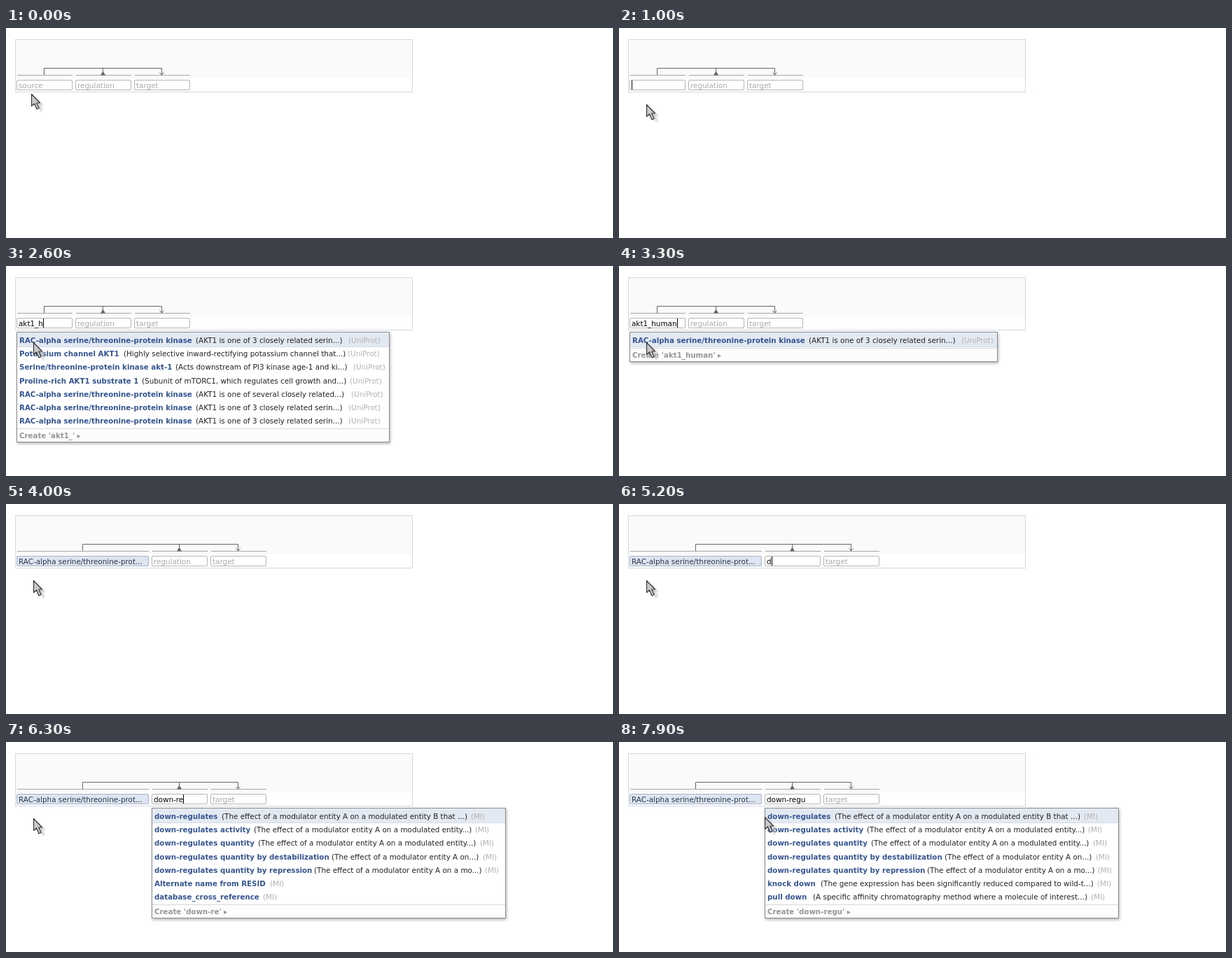
These frames come from a looping animation (867x300 px, 8000 ms). An HTML page:

```html
<!DOCTYPE html>
<html lang="en">
<head>
<meta charset="utf-8">
<title>Annotation editor</title>
<style>
html, body { margin: 0; width: 100%; height: 100%; overflow: hidden; background: #fff; }
#stage { position: relative; width: 867px; height: 300px; overflow: hidden; font: 10.4px/14px "DejaVu Sans", sans-serif; color: #222; }
#stage *, svg { position: absolute; box-sizing: border-box; }
#stage span { white-space: pre; }
svg { left: 0; top: 0; }
#panel { left: 13px; top: 16px; width: 568px; height: 76px; border: 1px solid #d3d7e6; background: linear-gradient(#fafafa 55px, #fff 55px); }
.field { top: 74px; height: 15px; border: 1px solid #b4b4b4; border-radius: 2px; background: #fff; }
.field span { left: 2px; top: 0; height: 13px; color: #000; }
.field .hint { color: #aaa; }
.field.chip { background: #dde5f1; border-color: #a8b3c8; }
.field.chip span { color: #2c3448; }
.field .caret { border-right: 1px solid #000; }
#popup { top: 94px; border: 1px solid #8c8c8c; background: #fff; box-shadow: 1px 2px 4px rgba(0, 0, 0, .3); }
.active { left: 0; top: 0; width: 100%; height: 21px; background: #e3e9f2; border-bottom: 1px solid #d6dde9; }
.footer { left: 0; bottom: 0; width: 100%; height: 19px; border-top: 1px solid #d8d8d8; background: #fdfdfd; }
.name { font-size: 10.25px; font-weight: bold; color: #36558f; }
.tag { color: #b2b2b2; }
.create { font-size: 10.25px; font-weight: bold; color: #969696; }
</style>
</head>
<body>
<div id="stage">
  <div id="panel"></div>
  <div id="form"></div>
  <div id="list"></div>
  <svg width="867" height="300">
    <defs>
      <path id="arrow" d="M0 0V17L4 13.5 7.5 21.5 10.7 20 7.2 12.5H12Z"/>
      <filter id="soft" x="-50%" y="-50%" width="200%" height="200%"><feGaussianBlur stdDeviation=".9"/></filter>
    </defs>
    <g id="pointer">
      <use href="#arrow" x="6" y="4" fill="#bbb" opacity=".65" filter="url(#soft)"/>
      <use href="#arrow" x=".5" y=".5" fill="#c9c9c9" stroke="#3a3a3a" stroke-width="1.2" stroke-linejoin="round"/>
    </g>
  </svg>
</div>
<script>
const LOOP = 8000;
const byId = id => document.getElementById(id);

// Row: name, description, description x, tag x
const catalyzes = ['Pyrimidine/purine nucleoside phosphorylase', 'Catalyzes the phosphorolysis of diver...', 284, 502];
const kinase = ['RAC-alpha serine/threonine-protein kinase', 'AKT1 is one of 3 closely related serin...', 272, 490];
const effect = 'The effect of a modulator entity A on a';
const down = ['down-regulates', effect + ' modulated entity B that ...', 309, 665];
const downAll = [
  down,
  ['down-regulates activity', effect + ' modulated entity...', 355, 671],
  ['down-regulates quantity', effect + ' modulated entity...', 361, 678],
  ['down-regulates quantity by destabilization', 'The effect of a modulator entity A on...', 466, 682],
  ['down-regulates quantity by repression', effect + ' mo...', 441, 685]
];
const bare = (name, x) => [name, '', 0, x];

const proteins = (width, rows) => ({ x: 15, width, tag: '(UniProt)', rows });
const terms = (width, rows) => ({ x: 208, width, tag: '(MI)', rows });
const lists = {
  ak: proteins(548, [
    catalyzes,
    ['Multifunctional fusion protein [Includes: GTP cyc...', 'Catalyzes the conversion of D...', 317, 497],
    catalyzes,
    ['Bifunctional protein GlmU [Includes: UDP-N-acetyl...', 'Catalyzes the last two sequen...', 325, 504],
    ['Siroheme synthase [Includes: Uroporphyrinogen-III...', 'Multifunctional enzyme that c...', 337, 512],
    ['Fatty acid oxidation complex subunit alpha [Inclu...', 'Involved in the aerobic and a...', 321, 499],
    ['Multifunctional fusion protein [Includes: ADP-dep...', 'Bifunctional enzyme that cata...', 323, 502]
  ]),
  akt: proteins(533, [
    kinase,
    ['Potassium channel AKT1', 'Highly selective inward-rectifying potassium channel that...', 169, 489],
    ['Serine/threonine-protein kinase akt-1', 'Acts downstream of PI3 kinase age-1 and ki...', 243, 497],
    ['Proline-rich AKT1 substrate 1', 'Subunit of mTORC1, which regulates cell growth and...', 195, 492],
    [kinase[0], 'AKT1 is one of several closely related...', 272, 494],
    kinase,
    kinase
  ]),
  human: proteins(526, [kinase]),
  start: terms(486, [
    down, bare('domain', 266), bare('donor', 256), bare('dose response', 310),
    bare('docking', 269), bare('double tag', 287), bare('dot blot', 271)
  ]),
  cross: terms(506, [...downAll, bare('Alternate name from RESID', 378), bare('database_cross_reference', 368)]),
  regu: terms(506, [
    ...downAll,
    ['knock down', 'The gene expression has been significantly reduced compared to wild-t...', 289, 684],
    ['pull down', 'A specific affinity chromatography method where a molecule of interest...', 278, 675]
  ])
};

// Each step changes part of the state: at = pointer, text = typed, list + query = popup
const steps = [
  [0, { at: [36, 94], focus: -1, text: '', caret: true, chip: false, list: '', query: '' }],
  [100, { at: [36, 93] }],
  [300, { at: [44, 88] }],
  [400, { at: [60, 80] }],
  [500, { at: [71, 75] }],
  [800, { at: [64, 84], focus: 0 }],
  [900, { at: [48, 100] }],
  [1000, { at: [39, 109] }],
  [1600, { text: 'a' }],
  [1700, { text: 'ak', list: 'ak', query: 'ak' }],
  [1900, { text: 'akt' }],
  [2000, { list: 'akt', query: 'akt' }],
  [2200, { text: 'akt1' }],
  [2300, { query: 'akt1' }],
  [2400, { text: 'akt1_' }],
  [2500, { query: 'akt1_' }],
  [2600, { text: 'akt1_h' }],
  [2700, { list: 'human', query: 'akt1_h' }],
  [2800, { text: 'akt1_hu' }],
  [2900, { query: 'akt1_hu' }],
  [3000, { text: 'akt1_hum' }],
  [3100, { text: 'akt1_huma', query: 'akt1_hum' }],
  [3200, { text: 'akt1_human', query: 'akt1_huma' }],
  [3300, { query: 'akt1_human' }],
  [3900, { list: '' }],
  [4000, { chip: true, focus: -1, text: '' }],
  [4100, { focus: 1 }],
  [5200, { text: 'd' }],
  [5300, { text: 'do', list: 'start', query: 'd' }],
  [5400, { text: 'dow', query: 'do' }],
  [5500, { text: 'down', query: 'down' }],
  [5700, { text: 'down-', list: 'cross', query: 'down-' }],
  [6100, { text: 'down-r' }],
  [6200, { query: 'down-r' }],
  [6300, { text: 'down-re', query: 'down-re' }],
  [6500, { text: 'down-reg', list: 'regu', query: 'down-reg' }],
  [6700, { text: 'down-regu', query: 'down-regu' }],
  [7100, { caret: false }],
  [7400, { at: [52, 110] }],
  [7500, { at: [92, 109] }],
  [7600, { at: [146, 107] }],
  [7700, { at: [196, 105] }],
  [7800, { at: [216, 106] }],
  [7900, { at: [208, 107] }]
];

let merged = {};
const states = steps.map(([time, change]) => (merged = { ...merged, ...change, time }));

const span = (cls, x, y, text) => `<span class="${cls}" style="left:${x}px;top:${y}px">${text}</span>`;

function formHtml(s) {
  const shift = s.chip ? 109 : 0;
  const fields = [
    { x: 15, w: 80 + shift, hint: 'source' },
    { x: 99 + shift, w: 80, hint: 'regulation' },
    { x: 183 + shift, w: 80, hint: 'target' }
  ];
  const boxes = fields.map((f, i) => {
    const chip = s.chip && i === 0;
    const typing = s.focus === i;
    const text = chip ? 'RAC-alpha serine/threonine-prot...' : typing ? s.text : f.hint;
    const cls = chip ? '' : typing ? (s.caret ? 'caret' : '') : 'hint';
    return `<div class="field ${chip ? 'chip' : ''}" style="left:${f.x}px;width:${f.w}px"><span class="${cls}">${text}</span></div>`;
  }).join('');
  const [a, b, c] = fields.map(f => Math.floor(f.x + f.w / 2) + (f.w === 80 ? -.5 : .5));
  const from = s.chip ? a : a + .0;
  const rules = fields.map(f => `M${f.x + 1} 67.5h${f.w - 1}`).join('');
  return boxes + `<svg width="867" height="92" fill="none">
    <path d="${rules}" stroke="#a6a6a6"/>
    <path d="M${from} 67V57.5H${c}V67M${b} 57.5V63M${c - 3} 63.5L${c} 67L${c + 3} 63.5" stroke="#666"/>
    <path d="M${b} 61.5L${b + 3.5} 67.5H${b - 3.5}Z" fill="#666"/></svg>`;
}

function listHtml(s) {
  const list = lists[s.list];
  if (!list) return '';
  const { x, width, tag, rows } = list;
  const last = 106 + 19.17 * (rows.length - 1);
  // Positions inside the popup's border
  const left = px => px - x - 2;
  const top = centre => Math.round(centre) - 102;
  const lines = rows.map(([name, about, aboutX, tagX], i) => {
    const y = top(106 + 19.17 * i);
    return span('name', 3, y, name) + (about && span('about', left(aboutX), y, `(${about})`)) + span('tag', left(tagX), y, tag);
  }).join('');
  return `<div id="popup" style="left:${x}px;width:${width}px;height:${Math.round(last) - 63}px">
    <div class="active"></div><div class="footer"></div>${lines}
    ${span('create', 3, top(last + 21), `Create '${s.query}' ▸`)}</div>`;
}

let shown = null;
function show(s) {
  byId('form').innerHTML = formHtml(s);
  byId('list').innerHTML = listHtml(s);
  byId('pointer').setAttribute('transform', `translate(${s.at})`);
  shown = s;
}

const start = performance.now();
function tick() {
  const time = (performance.now() - start) % LOOP;
  const state = states.findLast(s => s.time <= time);
  if (state !== shown) show(state);
  requestAnimationFrame(tick);
}
tick();
</script>
</body>
</html>
```
